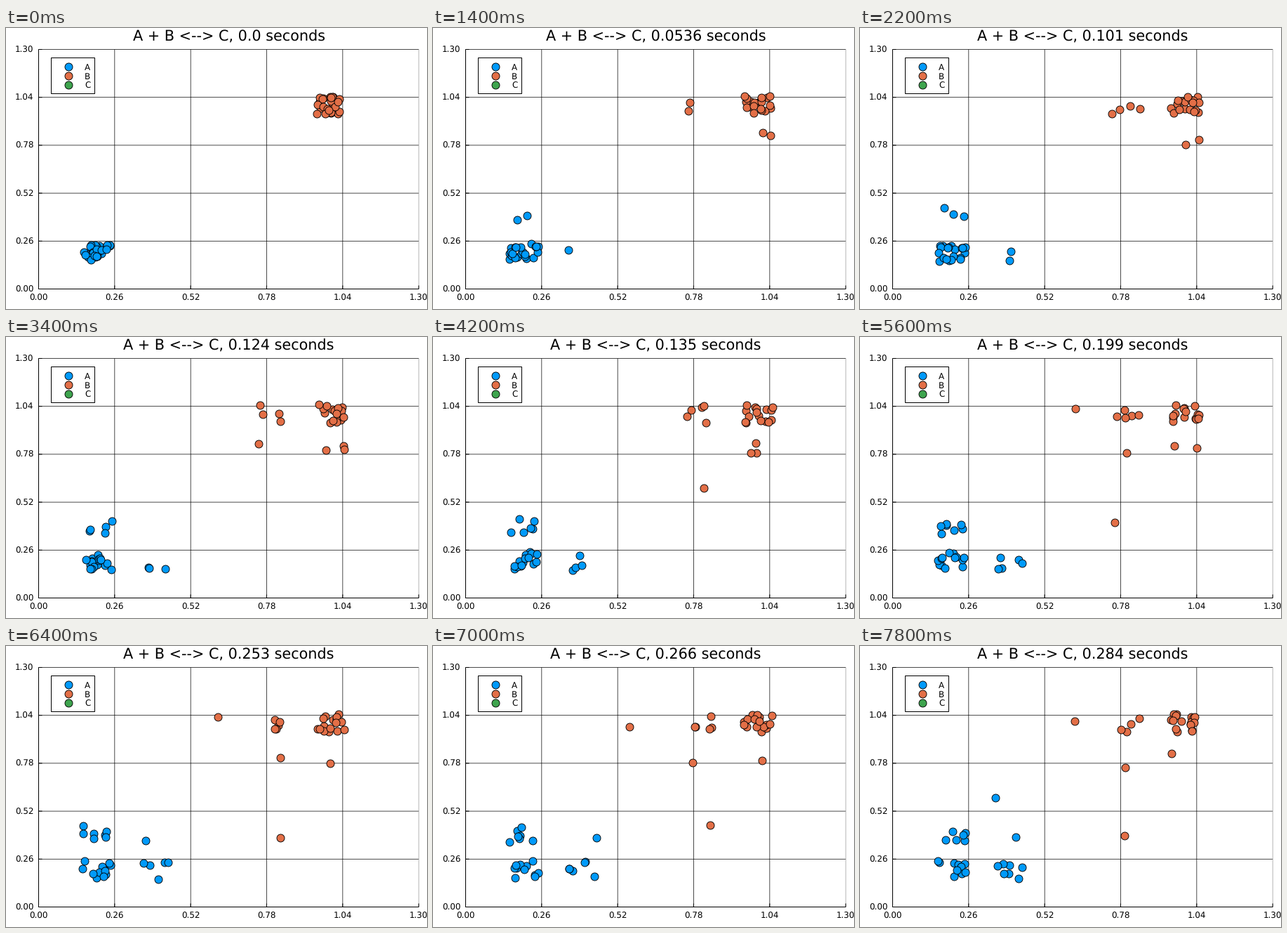
A matplotlib script for the animation above (8000 ms loop, 600x400 px).

```python
import numpy as np
import matplotlib.pyplot as plt
from matplotlib.animation import FuncAnimation
from matplotlib.patches import Rectangle

DPI = 100
PX = 72 / DPI                      # points per pixel
LEFT, RIGHT, TOP, BOTTOM = 46.5, 588.2, 30.5, 371.5
SPAN, TICKS = 1.3, 5
CELL, SPREAD = 0.2, 0.05
COUNT, FRAMES = 25, 40
COLORS = {"A": "#009AFA", "B": "#E36F47", "C": "#3EA44E"}
HOME = {"A": (1, 1), "B": (5, 5)}
STEP = {"N": (0, 1), "S": (0, -1), "E": (1, 0), "W": (-1, 0)}

# Frames at which one more particle leaves its home cell, by direction.
# A leaves at a steady pace, B ever more slowly to the west.
LEAVE = {
    "A": {"N": range(1, 30, 4), "E": np.linspace(4, 39, 7).astype(int)},
    "B": {"W": [4 + k * (k + 2) // 2 for k in range(7)],
          "S": range(2, 13, 5)},
}

# Later hops of the few particles that wander on: (frame, direction).
WANDER = {
    ("A", 0): [(30, "E"), (36, "N")],
    ("A", 1): [(38, "E")],
    ("B", 0): [(15, "S"), (20, "S"), (26, "S")],
    ("B", 1): [(28, "W")],
    ("B", 2): [(36, "E")],
    ("B", 7): [(23, "W")],
    ("B", 8): [(31, "N")],
}

# Elapsed time runs evenly between these (frame, seconds) points.
CLOCK = np.array([(0, 0), (7, 0.0536), (11, 0.101), (17, 0.124),
                  (24, 0.144), (32, 0.253), (39, 0.284)])


def hops(kind):
    """All hops of a species as (particle, frame, direction)."""
    first = [(n, d) for d, times in LEAVE[kind].items() for n in times]
    for i, hop in enumerate(first):
        for n, d in [hop] + WANDER.get((kind, i), []):
            yield i, n, d


def cells(kind, frame):
    grid = np.tile(HOME[kind], (COUNT, 1))
    for i, n, d in hops(kind):
        if n <= frame:
            grid[i] += STEP[d]
    return grid


def to_px(xy):
    return np.column_stack([LEFT + xy[:, 0] * (RIGHT - LEFT) / SPAN,
                            BOTTOM - xy[:, 1] * (BOTTOM - TOP) / SPAN])


plt.rcParams["font.family"] = "DejaVu Sans"
plt.rcParams["text.hinting"] = "none"
fig = plt.figure(figsize=(600 / DPI, 400 / DPI), dpi=DPI, facecolor="white")
ax = fig.add_axes([0, 0, 1, 1])
ax.set_xlim(0, 600)
ax.set_ylim(400, 0)
ax.axis("off")


def line(x, y, width=1.0, color="black"):
    ax.plot(x, y, color=color, lw=width * PX, solid_capstyle="butt",
            snap=False, zorder=1)


def label(x, y, text, size=11.9, ha="center"):
    return ax.text(x, y, text, fontsize=size * PX, ha=ha, va="baseline")


def dots(color, z=3):
    return ax.scatter([], [], s=(11 * PX) ** 2, c=color, edgecolors="black",
                      linewidths=0.9 * PX, snap=False, zorder=z)


for k in range(TICKS + 1):
    x = LEFT + k * (RIGHT - LEFT) / TICKS
    y = BOTTOM - k * (BOTTOM - TOP) / TICKS
    value = f"{SPAN * k / TICKS:.2f}"
    line([x, x], [TOP, BOTTOM], 0.7, "#999999" if k == TICKS else "black")
    line([LEFT, RIGHT], [y, y], 0.7)
    line([x, x], [BOTTOM - 5, BOTTOM])
    line([LEFT, LEFT + 5], [y, y])
    label(x, 387.5, value)
    label(39.3, y + 4.4, value, ha="right")
line([LEFT, LEFT], [TOP, BOTTOM])
line([LEFT, RIGHT], [BOTTOM, BOTTOM])

ax.add_patch(Rectangle((64.5, 42.5), 62, 51, fc="white", ec="black", lw=PX,
                       snap=False, zorder=2))
for k, (name, color) in enumerate(COLORS.items()):
    y = 55.2 + 13 * k
    dots(color).set_offsets([(88.5, y)])
    label(112, y + 4.4, name, ha="left")

title = label(317.7, 18.6, "", size=20.8)
clouds = {kind: dots(COLORS[kind], 4) for kind in HOME}


def draw(n):
    rng = np.random.default_rng(500 + n)
    for kind, cloud in clouds.items():
        jitter = rng.uniform(-SPREAD, SPREAD, (COUNT, 2))
        cloud.set_offsets(to_px(CELL * cells(kind, n) + jitter))
    stamp = f"{np.interp(n, *CLOCK.T):.3g}" if n else "0.0"
    title.set_text(f"A + B <--> C, {stamp} seconds")
    return [title, *clouds.values()]


anim = FuncAnimation(fig, draw, frames=FRAMES, init_func=lambda: draw(0),
                     interval=200, repeat=True, repeat_delay=0, blit=False)
plt.show()
```
